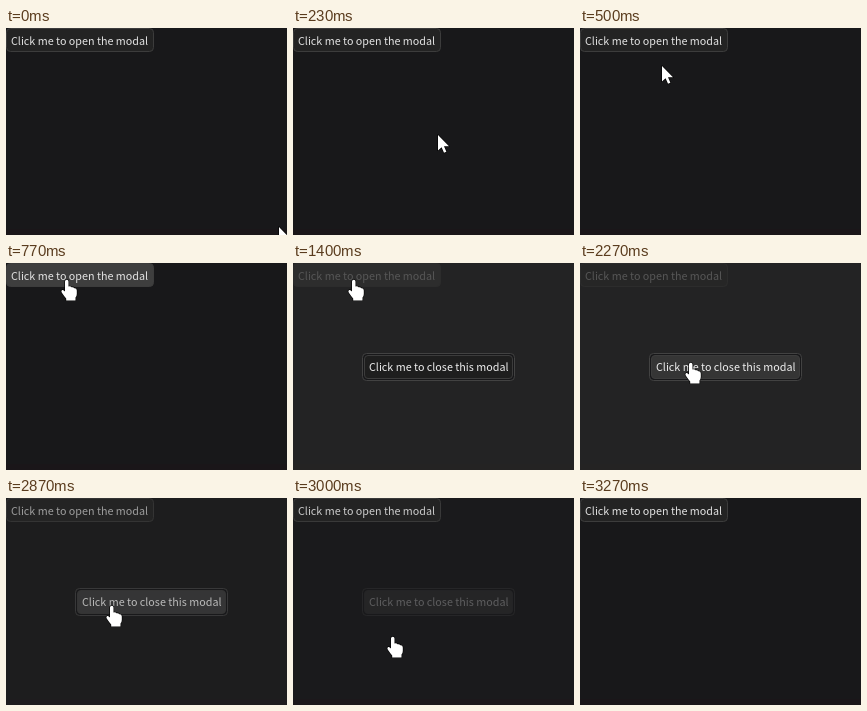
An HTML page that plays this animation: 281x207 px, repeating every 4.13 s.

```html
<!DOCTYPE html>
<html lang="en">
<head>
<meta charset="utf-8">
<title>Modal demo</title>
<style>
  html, body { margin: 0; width: 100%; height: 100%; overflow: hidden; background: #18181a; }
  svg { display: block; }
  text { font: 10.75px "Noto Sans CJK JP", "Noto Sans CJK SC", "Noto Sans CJK", "Noto Sans", sans-serif; fill: #e2e2e2; }
  .btn { stroke: #3c3c3c; }
  .cursor { fill: #fff; stroke: #000; stroke-width: 1.2; stroke-linejoin: round; paint-order: stroke; }
</style>
</head>
<body>
<svg width="281" height="207" viewBox="0 0 281 207">
  <rect width="281" height="207" fill="#18181a"/>
  <rect y="201" width="281" height="6" fill="#1a1619"/>
  <rect id="openBtn" class="btn" x=".5" y=".5" width="147" height="23" rx="4"/>
  <text x="5" y="17">Click me to open the modal</text>
  <rect id="backdrop" width="281" height="207" fill="#272727"/>
  <g id="modal">
    <rect x="69.5" y="90.5" width="152" height="27" rx="4" fill="#18181a" stroke="#424242"/>
    <rect id="closeBtn" class="btn" x="71.5" y="92.5" width="148" height="23" rx="3.5"/>
    <text x="76" y="108" style="fill:#eee">Click me to close this modal</text>
  </g>
  <g id="cursor">
    <path id="arrow" class="cursor" d="M0 0V15.5L3.6 12.2 6 17.8 8.4 16.8 6 11.3H11Z"/>
    <path id="hand" class="cursor" d="M-2 1.5A1.75 1.75 0 0 1 1.5 1.5V6.5Q3.5 5.8 4.5 7.3 6.5 6.8 7.3 8.3 9.8 8 9.8 10.5V14Q9.8 16 8.5 17.5V20.5H-.8V18.5Q-3 16-5.3 12.5-6.3 10.5-4.8 10-3.5 9.6-2 11.5Z"/>
  </g>
</svg>
<script>
const LOOP = 4130;
const $ = id => document.getElementById(id);
const [openBtn, closeBtn, backdrop, modal, cursor, arrow, hand] =
  ['openBtn', 'closeBtn', 'backdrop', 'modal', 'cursor', 'arrow', 'hand'].map($);

// Pointer tip: time, x, y
const path = [
  [30, 273, 199], [130, 203, 155], [230, 145, 107], [370, 104, 63], [530, 77, 33],
  [570, 68, 22], [680, 61, 17], [1600, 61, 17], [1760, 64, 31], [1930, 70, 56],
  [2100, 87, 86], [2200, 104, 97], [2330, 117, 102], [2869, 117, 102],
  [2870, 106, 108], [3050, 98, 150], [3260, 88, 212]
];

const ramp = (t, from, to) => Math.min(1, Math.max(0, (t - from) / (to - from)));
const show = (el, on) => el.setAttribute('visibility', on ? 'visible' : 'hidden');

function tip(t) {
  const i = path.findIndex(k => k[0] > t);
  if (i < 0) return path[path.length - 1].slice(1);
  if (i === 0) return path[0].slice(1);
  const [t0, x0, y0] = path[i - 1], [t1, x1, y1] = path[i];
  const f = (t - t0) / (t1 - t0);
  return [x0 + (x1 - x0) * f, y0 + (y1 - y0) * f].map(Math.round);
}

function fillButton(el, base, hover) {
  const v = Math.round(base + (62 - base) * hover);
  el.setAttribute('fill', `rgb(${v},${v},${v})`);
}

function draw(t) {
  // Closing is already halfway when it first becomes visible
  const open = t < 2870 ? ramp(t, 1140, 1400) : 0.5 * (1 - ramp(t, 2870, 3070));
  backdrop.setAttribute('opacity', 0.75 * open);
  modal.setAttribute('opacity', 1 - (1 - open) ** 2);
  fillButton(openBtn, 35, ramp(t, 550, 770) - ramp(t, 1600, 1800));
  fillButton(closeBtn, 30, ramp(t, 2120, 2330));

  const onHand = t >= 570 && t < 3070;
  show(hand, onHand && t < 3260);
  show(arrow, !onHand && t < 3260);
  cursor.setAttribute('transform', `translate(${tip(t)})`);
}

const start = performance.now();
function tick() {
  draw((performance.now() - start) % LOOP);
  requestAnimationFrame(tick);
}
tick();
</script>
</body>
</html>
```
